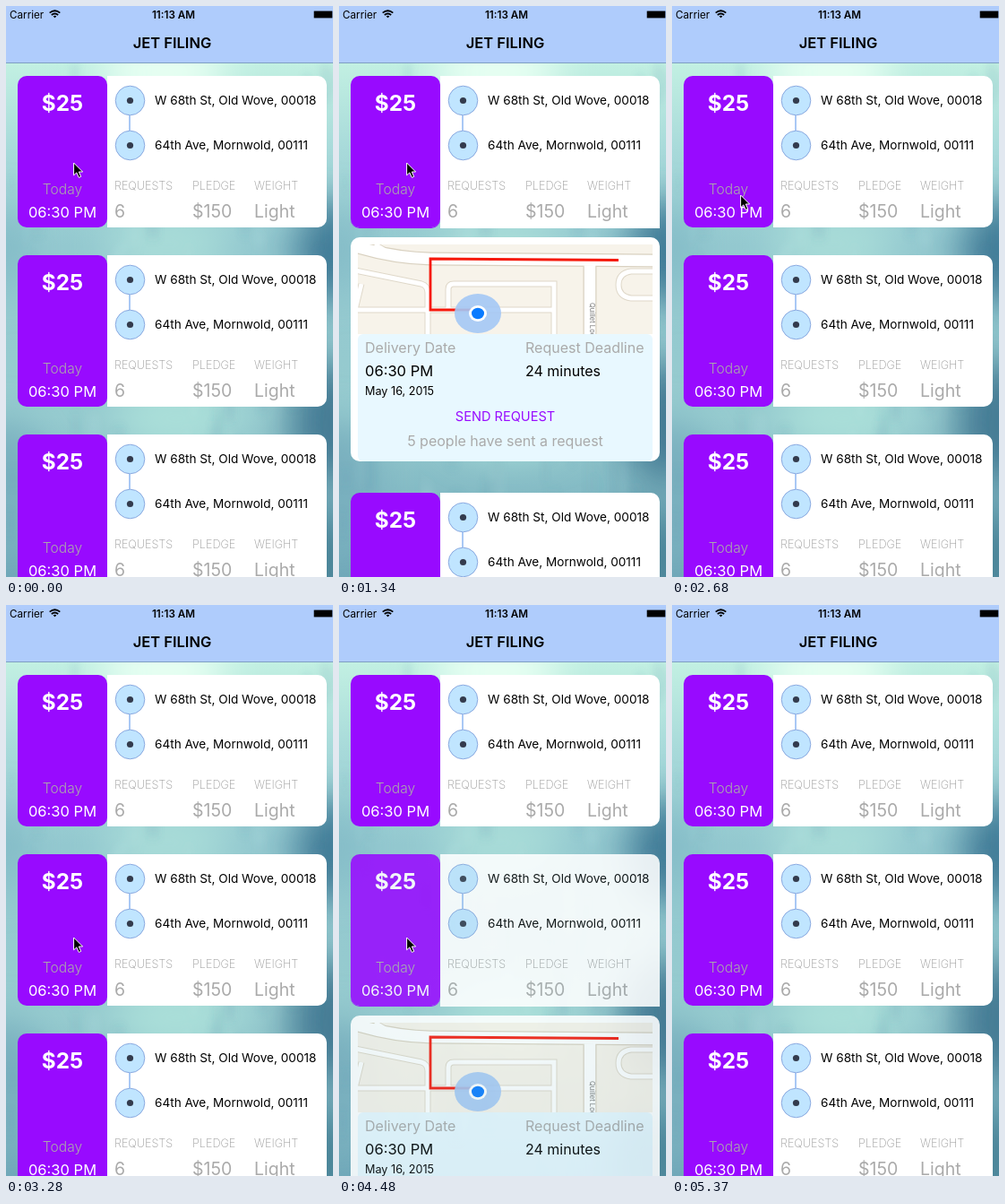
Animation, 365 px wide and 637 px high, one loop 5.66 s. Source, as an HTML page:

```html
<!DOCTYPE html>
<html lang="en">
<head>
<meta charset="utf-8">
<title>Delivery cards</title>
<style>
  html, body { margin: 0; width: 100%; height: 100%; overflow: hidden; }
  svg { display: block; font-family: Inter, "Open Sans", sans-serif; font-size: 16.5px; }
  .mid { text-anchor: middle; }
  .grey { font-size: 16px; fill: #aaa; }
  .day { font-size: 15.6px; font-weight: 300; fill: #aaa; }
  .label { font-size: 12.65px; font-weight: 200; fill: #999; }
  .value { font-size: 19.5px; fill: #aaa; }
  .addr { font-size: 13.6px; }
  .price { font-size: 24.3px; font-weight: 700; fill: #fff; }
  .status { font-size: 11.7px; }
  .bold { font-weight: 600; }
</style>
</head>
<body>
<svg width="365" height="637" viewBox="0 0 365 637">
  <defs>
    <linearGradient id="water" x2="0" y2="1">
      <stop offset=".1" stop-color="#c2f0e2"/>
      <stop offset=".25" stop-color="#a8dada"/>
      <stop offset=".42" stop-color="#93c8cf"/>
      <stop offset=".72" stop-color="#96cbcf"/>
      <stop offset="1" stop-color="#70a8b9"/>
    </linearGradient>
    <filter id="soft" x="-50%" y="-50%" width="200%" height="200%"><feGaussianBlur stdDeviation="22"/></filter>
    <filter id="smear"><feGaussianBlur stdDeviation="3 6"/></filter>

    <g id="card">
      <path d="M113 0H348A10 10 0 0 1 358 10V159A10 10 0 0 1 348 169H113Z" fill="#fff"/>
      <rect x="13" width="100" height="169" rx="10" fill="#980aff"/>
      <text class="price mid" x="63" y="39">$25</text>
      <text class="day mid" x="63" y="132">Today</text>
      <text class="mid" x="63" y="158" fill="#fff">06:30 PM</text>
      <path d="M138 44V61" stroke="#a9c8f5" stroke-width="2"/>
      <g fill="#c0e5ff" stroke="#8aa9e0">
        <circle cx="138.5" cy="27.5" r="16.3"/>
        <circle cx="138.5" cy="77.5" r="16.3"/>
      </g>
      <g fill="#333b4d">
        <circle cx="138.5" cy="27.5" r="3.6"/>
        <circle cx="138.5" cy="77.5" r="3.6"/>
      </g>
      <text class="addr" x="166" y="32">W 68th St, Old Wove, 00018</text>
      <text class="addr" x="166" y="82">64th Ave, Mornwold, 00111</text>
      <g class="label">
        <text x="121" y="127">REQUESTS</text>
        <text x="208" y="127">PLEDGE</text>
        <text x="277" y="127">WEIGHT</text>
      </g>
      <g class="value">
        <text x="121" y="158">6</text>
        <text x="208" y="158">$150</text>
        <text x="277" y="158">Light</text>
      </g>
    </g>
    <g id="edge">
      <path d="M113 169V170H358V155H348V169Z" fill="#fff"/>
      <path d="M13 159A10 10 0 0 0 23 169H103A10 10 0 0 0 113 159V160A10 10 0 0 1 103 170H23A10 10 0 0 1 13 160Z" fill="#980aff"/>
    </g>

    <clipPath id="mapArea"><rect x="21" y="8" width="329" height="100"/></clipPath>
    <g id="roads" fill="none">
      <path d="M18 37L92 52Q99 54 99 62V110M18 81H240V110M122 81V58Q122 52 128 52H240V81M25 52L18 81M40 8L60 20"/>
      <path d="M355 38H326Q312 40 312 53T326 68H355"/>
    </g>
    <path id="mainRoad" fill="none" d="M18 10Q60 23 102 24L355 26M280 25V110"/>

    <g id="panel">
      <rect x="13" width="345" height="250" rx="10" fill="#fff"/>
      <g clip-path="url(#mapArea)">
        <rect x="21" y="8" width="329" height="100" fill="#f7f3ea"/>
        <use href="#roads" stroke="#dfd8c9" stroke-width="7"/>
        <use href="#mainRoad" stroke="#d9d1c0" stroke-width="15"/>
        <use href="#roads" stroke="#fff" stroke-width="5"/>
        <use href="#mainRoad" stroke="#fff" stroke-width="12.5"/>
        <text transform="translate(279.5 73) rotate(90)" font-size="7.6" fill="#777">Quillet Loop</text>
        <path d="M312 25.5L102 24V81H152" fill="none" stroke="#f6190b" stroke-width="2.8"/>
        <ellipse cx="155" cy="85" rx="26" ry="22" fill="#a5c8f6" opacity=".9"/>
        <ellipse cx="155" cy="85" rx="10" ry="9" fill="#fff"/>
        <ellipse cx="155" cy="85" rx="7" ry="6.2" fill="#0a7bff"/>
      </g>
      <rect x="21" y="108" width="329" height="142" rx="6" fill="#e8f8ff"/>
      <text class="grey" x="29" y="129">Delivery Date</text>
      <text class="grey" x="208" y="129">Request Deadline</text>
      <text x="29" y="155">06:30 PM</text>
      <text x="208" y="155" font-size="16">24 minutes</text>
      <text x="29" y="176" font-size="12.65">May 16, 2015</text>
      <text class="mid" x="185.5" y="205" font-size="14.6" fill="#980aff">SEND REQUEST</text>
      <text class="grey mid" x="185.5" y="233">5 people have sent a request</text>
    </g>

    <clipPath id="reveal">
      <rect id="above" width="365"/>
      <rect id="below" width="365" height="637"/>
    </clipPath>
  </defs>

  <rect width="365" height="637" fill="url(#water)"/>
  <g filter="url(#soft)">
    <ellipse cx="175" cy="75" rx="70" ry="45" fill="#e6fff2"/>
    <ellipse cx="180" cy="265" rx="70" ry="40" fill="#a8dcd8"/>
    <ellipse cx="190" cy="460" rx="70" ry="40" fill="#aadfd9"/>
    <ellipse cx="0" cy="270" rx="20" ry="50" fill="#7fb8c5"/>
    <ellipse cx="0" cy="530" rx="40" ry="70" fill="#78afbe"/>
    <ellipse cx="365" cy="275" rx="42" ry="60" fill="#417a96"/>
    <ellipse cx="365" cy="465" rx="50" ry="70" fill="#457c94"/>
    <ellipse cx="350" cy="620" rx="50" ry="60" fill="#4c8599"/>
  </g>
  <g id="streaks" filter="url(#smear)"></g>

  <g clip-path="url(#reveal)"><use id="detail" href="#panel"/></g>
  <path id="rule" d="M13 .5H365" stroke="#d3dddd"/>
  <g id="cards"></g>

  <rect width="365" height="63" fill="#afccfc"/>
  <path d="M0 63.5H365" stroke="#7f9fc2"/>
  <text class="status" x="4" y="13.5">Carrier</text>
  <g fill="none" stroke="#000" stroke-width="1.7">
    <path d="M48.7 7.7Q54.5 2.8 60.3 7.7M50.8 10Q54.5 7 58.2 10"/>
    <path d="M54.5 13.3L52.6 11.4Q54.5 10 56.4 11.4Z" fill="#000" stroke="none"/>
  </g>
  <text class="status bold mid" x="187" y="13.5">11:13 AM</text>
  <rect x="343.7" y="5.6" width="20.6" height="7.8"/>
  <text class="bold mid" x="185.5" y="47">JET FILING</text>

  <path id="cursor" d="M.6 1V14.8L3.8 11.9L6.3 17.4L8.7 16.4L6.3 11H10.6Z" stroke="#fff"/>
</svg>
<script>
const LOOP = 5660;
const $ = id => document.getElementById(id);
const set = (el, attrs) => { for (const k in attrs) el.setAttribute(k, attrs[k]); };
const add = (parent, tag, attrs) => {
  const el = document.createElementNS("http://www.w3.org/2000/svg", tag);
  set(el, attrs);
  return parent.appendChild(el);
};

// time, open row, shift of the cards below, panel opacity
const folds = [
  [0, 0, 0, 0],
  [1050, 0, 34, .17], [1190, 0, 165, .6], [1340, 0, 265, 1],
  [2390, 0, 235, .87], [2540, 0, 95, .4], [2680, 0, 0, 0],
  [3430, 1, 120, .45], [3580, 1, 265, 1],
  [4480, 1, 235, .87], [4630, 1, 95, .4], [4780, 1, 0, 0]
];
// time, pointer x, y
const moves = [
  [0, 75, 174], [2680, 76, 210], [2830, 75, 368], [2980, 75, 370],
  [4930, 75, 374], [5080, 261, 601], [5220, 267, 617], [5370, -50, -50]
];
const at = (steps, t) => steps.findLast(s => s[0] <= t);

let seed = 7;
const rnd = () => (seed = seed * 16807 % 2147483647) / 2147483647;
for (let i = 0; i < 110; i++) {
  add($("streaks"), "rect", {
    x: rnd() * 365, y: 50 + rnd() * 560, width: 4 + rnd() * 12, height: 15 + rnd() * 50,
    fill: rnd() < .5 ? "#d8fff4" : "#4884a0", opacity: .03 + rnd() * .09
  });
}

const cards = [0, 1, 2].map(() => {
  const g = add($("cards"), "g", {});
  add(g, "use", { href: "#card" });
  return { g, edge: add(g, "use", { href: "#edge" }) };
});

function draw(now) {
  const t = now % LOOP;
  const [, row, shift, alpha] = at(folds, t);
  const [, x, y] = at(moves, t);
  const panelTop = 258 + 200 * row;
  const cellTop = panelTop + 5 + shift, cellEnd = cellTop + 199;

  cards.forEach(({ g, edge }, i) => {
    const open = i === row;
    set(g, {
      transform: `translate(0 ${78 + 200 * i + (i > row ? shift : 0)})`,
      opacity: open && alpha > 0 && alpha < 1 ? .87 : 1
    });
    set(edge, { opacity: open && shift > 200 ? 1 : 0 });
  });
  set($("detail"), { transform: `translate(0 ${panelTop})`, opacity: alpha });
  set($("above"), { height: cellTop });
  set($("below"), { y: cellEnd });
  set($("rule"), {
    transform: `translate(0 ${cellEnd})`,
    opacity: shift && cellEnd < panelTop + 250 ? 1 : 0
  });
  set($("cursor"), { transform: `translate(${x} ${y})` });
  requestAnimationFrame(draw);
}
draw(performance.now());
</script>
</body>
</html>
```
